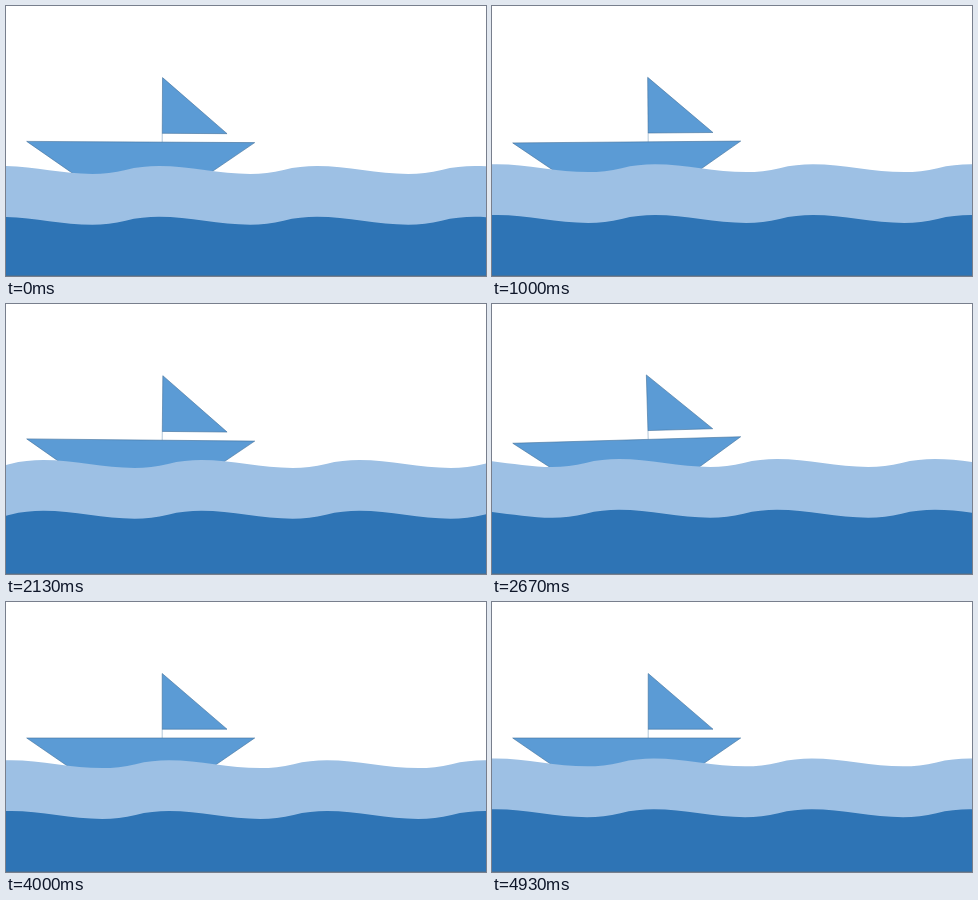
Write an HTML page with a canvas that moves like this. It is 480 px wide and 270 px high and loops after 4990 ms.

```html
<!DOCTYPE html>
<html lang="en">
<head>
<meta charset="utf-8">
<title>Sailing boat</title>
<style>
html, body { margin: 0; width: 100%; height: 100%; overflow: hidden; background: #fff; }
canvas { display: block; }
</style>
</head>
<body>
<canvas id="stage" width="480" height="270"></canvas>
<script>
const ctx = document.getElementById('stage').getContext('2d');
const LOOP = 4990, FPS = 15, PERIOD = 158, SWELL = 13.7;

// Teeter: lean, hold, rock three times, settle
const TEETER = [[0, 0], [0.1, 2], [0.2, 2], [0.4, -2], [0.6, 2], [0.8, -2], [1, 0]];

function tilt(seconds) {
  const p = (seconds + 0.05) / 3.25;
  const i = TEETER.findIndex(([at]) => at > p);
  if (i < 0) return 0;
  const [a, from] = TEETER[i - 1], [b, to] = TEETER[i];
  return from + (to - from) * (p - a) / (b - a);
}

function shape(points) {
  ctx.beginPath();
  points.forEach(([x, y]) => ctx.lineTo(x, y));
  ctx.closePath();
  ctx.fill();
  ctx.stroke();
}

function boat(degrees) {
  ctx.save();
  ctx.translate(134.7, 135.8);
  ctx.rotate(degrees * Math.PI / 180);
  ctx.translate(-134.7, -135.8);
  ctx.fillStyle = '#5b9bd5';
  ctx.strokeStyle = '#41719c';
  ctx.lineWidth = 0.6;
  shape([[20.7, 136], [248.7, 136], [177.5, 185], [92, 185]]);
  shape([[156.2, 71.5], [156.2, 127.2], [221, 127.2]]);
  ctx.lineWidth = 0.4;
  ctx.beginPath();
  ctx.moveTo(156.2, 127);
  ctx.lineTo(156.2, 136);
  ctx.stroke();
  ctx.restore();
}

function wave(x, y, color) {
  ctx.fillStyle = color;
  ctx.beginPath();
  ctx.moveTo(x, y);
  for (; x < 480; x += PERIOD) {
    ctx.bezierCurveTo(x + PERIOD / 3, y - SWELL, x + PERIOD * 2 / 3, y + SWELL, x + PERIOD, y);
  }
  ctx.lineTo(x, 270);
  ctx.lineTo(-PERIOD, 270);
  ctx.fill();
}

function draw(now) {
  const frame = Math.floor((now % LOOP + 5) * FPS / 1000);
  const step = frame % 45;
  const x = (119.6 + 11.2 * step) % PERIOD - PERIOD;
  const y = 164 - 0.125 * step;

  ctx.fillStyle = '#fff';
  ctx.fillRect(0, 0, 480, 270);
  boat(tilt(frame / FPS));
  wave(x, y, '#9dc0e4');
  wave(x, y + 50.8, '#2e74b5');
  ctx.fillStyle = '#41719c';
  ctx.fillRect(0, 269, 480, 1);
}

const start = performance.now();
function tick() {
  draw(performance.now() - start);
  requestAnimationFrame(tick);
}
tick();
</script>
</body>
</html>
```
